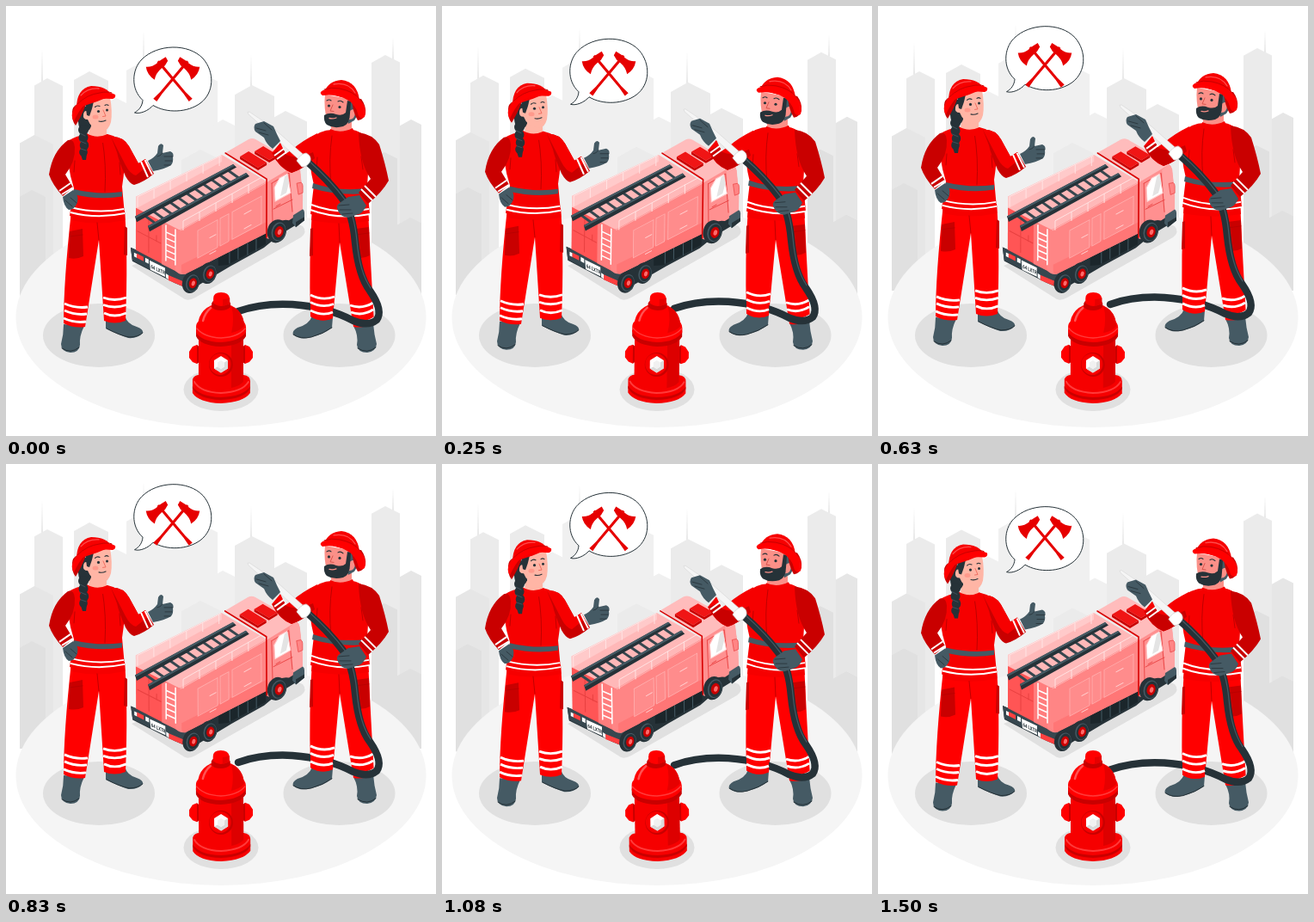
Recreate the animation shown at these times as an HTML page. Size 500 by 500 pixels, loop 1.54 s.

```html
<!DOCTYPE html>
<html lang="en">
<head>
<meta charset="utf-8">
<title>Firefighters</title>
<style>
html, body { margin: 0; width: 100%; height: 100%; overflow: hidden; background: #fff; }
svg { display: block; width: 100%; height: 100%; }
.bright { fill: #ff0000; }
.coat { fill: #f60000; }
.deep { fill: #c90000; }
.grey { fill: #455a64; }
.dark { fill: #263238; }
.skin { fill: #ffb5a5; }
.line { fill: none; stroke-linecap: round; stroke-linejoin: round; }
.stripe { fill: none; stroke: #fff; stroke-width: 2.9; }
.thin { stroke-width: 2; }
.fold { fill: none; stroke: #b80000; stroke-width: .9; stroke-linecap: round; }
.face { fill: none; stroke: #263238; stroke-width: 1.1; stroke-linecap: round; }
.rail { fill: none; stroke: #ffe6e6; stroke-width: .9; }
.panel { fill: #ff8c8c; stroke: #ffb0b0; stroke-width: .8; }
</style>
</head>
<body>
<svg viewBox="0 0 500 500">
  <g id="city"></g>

  <ellipse cx="250" cy="362" rx="238.500" ry="128" fill="#f5f5f5"/>
  <g fill="#e0e0e0">
    <ellipse cx="108" cy="383" rx="65" ry="37"/>
    <ellipse cx="387.500" cy="383" rx="65" ry="37"/>
    <ellipse cx="250" cy="446" rx="43.500" ry="25"/>
    <path d="M146 302L208 341Q213 343 220 339L343 269Q351 263 345 256L300 240Z"/>
  </g>

  <g id="truck">
    <path class="dark" d="M145 281L205 306L303 255L346 238V249L318 266L300 281L262 302L215 330L196 322L147 297Z"/>
    <path fill="#37474f" d="M145 281L198 307L212 311V329L196 321L147 296Z"/>
    <path fill="#1b262b" d="M247 291L302 264V277L258 301L247 302Z"/>
    <path class="line" stroke="#455a64" d="M260 286V299M270 281V294M281 276V289M291 271V284"/>
    <path fill="#ff4040" d="M152 288L160 292V297L152 293ZM189 313L208 321V327L189 319Z"/>
    <path fill="#fff" d="M149 287L152 288.500V293L149 291.500ZM162 293L166 295V300L162 298ZM186 311L189 313V318L186 316ZM167 296L185 304.500V315L168 307Z"/>
    <text transform="translate(168.500 305) skewY(25) scale(.72 1)" font-family="Roboto, sans-serif" font-weight="700" font-size="6" fill="#263238">64 LXTR</text>

    <path fill="#ffb8b8" d="M151 222L251 173L303 204L203 263L151 238Z"/>
    <path fill="#ffcaca" d="M151 222L251 173V181L151 236Z"/>
    <path fill="#ff5555" d="M151 235L203 262V311L151 284Z"/>
    <path fill="#ff7d7d" d="M181 250L203 261V311L181 300Z"/>
    <path fill="#ff8585" d="M196 264Q197 260 203 260L303 204V264L208 312Q202 313 197 308Z"/>
    <path class="line" stroke="#ffb0b0" d="M203 261L303 205"/>
    <path fill="#ff7676" d="M204 301L303 251V264L208 312Q204 312 204 308Z"/>
    <g transform="translate(203 262) skewY(-28.500)">
      <rect class="panel" x="20" y="10" width="23" height="32"/>
      <rect class="panel" x="46" y="10" width="10" height="32"/>
      <rect class="panel" x="60" y="10" width="34" height="32"/>
      <path class="line" stroke="#ffd2d2" d="M34 26h7M34 45h7M74 20h8M74 37h8"/>
    </g>
    <path class="line" stroke="#e84040" d="M166 248V287M153 262L180 276M175 267V274"/>
    <path class="line" stroke="#fff" stroke-width="1.500" d="M186 255V296M197 260V301M186 263L197 268M186 270L197 275M186 277L197 282M186 284L197 289M186 291L197 296"/>
    <path class="rail" d="M153 222L250 174M153 222V234M172 213V224M191 203V214M210 194V204M229 184V195M248 175V186M206 250L301 197M206 250V261M225 239V250M244 229V239M263 218V229M282 207V218"/>

    <g id="rungs" stroke="#37474f" stroke-width="3"></g>
    <path class="dark" d="M150 245L264 184L268 187.500L152 251.500ZM165 256L279 194L283 198L167 262.500Z"/>
    <path fill="#455a64" d="M150 245L264 184L266 185.500L151 247ZM165 256L279 194L281 195.500L166 258Z"/>

    <path fill="#ffbcbc" d="M256 170L282 155Q286 153 290 155L337 182Q340 185 337 187L306 205Z"/>
    <path fill="#ff9090" d="M303 205L338 184Q341 185 341.500 190L344 210L345 239L329 249Q316 247 309 259L306 271L303 270Z"/>
    <path fill="#ffa3a3" d="M330 190L338 184Q341 186 342 190L345 220V238L334 243Z"/>
    <path class="line" stroke="#d80000" stroke-width="1.600" d="M255 171L303 201V269"/>
    <path fill="#f01515" d="M289 169L299 163L316 173L306 179ZM272 175L282 169L303 182L293 188Z"/>
    <path fill="#c90000" d="M289 169L306 179L316 173V176L306 182L289 172ZM272 175L293 188L303 182V185L293 191L272 178Z"/>
    <path class="line" stroke="#e84040" stroke-width=".9" d="M309 206L329 194L333 239M309 206L310 251M311 236L333 225M314 233L319 230"/>
    <path fill="#fff" stroke="#ffd0d0" d="M312 211L318 200L327 195L331 217L313 227Z"/>
    <path fill="#e4e4e4" d="M319 221L324 198L327 196L329 205L326 217Z"/>
    <path fill="#ff8585" stroke="#e84040" stroke-width=".7" d="M338 206L343 205Q345 206 345 209V217L340 219Z"/>
    <path class="grey" d="M334 243L345 236Q347 237 347 240V249L337 257L333 252Z"/>
    <path class="dark" d="M337 251L347 245V249L337 257Z"/>
    <g id="wheels"></g>
  </g>

  <g id="woman">
    <!-- legs -->
    <path class="grey" d="M67 370L91 372Q85 384 86 394Q85 403 75 403Q64 402 64 393Q67 382 67 370Z"/>
    <path class="grey" d="M116 362L138 360Q141 370 152 373Q160 376 159 380Q153 387 142 386Q130 382 116 375Z"/>
    <path class="line" stroke="#263238" d="M65 398Q75 405 85 397M117 375Q132 383 143 385Q154 385 159 380"/>
    <path class="bright" d="M76 238H138Q142 290 139 366Q126 371 114 366L108 272L92 373Q79 375 67 369Q67 320 76 238Z"/>
    <path class="coat" d="M76 240H138L138.500 249Q106 256 75 249Z"/>
    <path class="deep" d="M74 262L89 259L90 291Q82 295 73 293ZM138 256L141 258V290L137 289Z"/>
    <path class="fold" d="M108 272L106 252M74 268L89 266"/>
    <path class="stripe" d="M68 346Q81 352 95 350M68 354Q81 360 94 358M67 363Q80 369 93 367M113 339Q126 344 140 339M113 347.500Q126 352.500 140 347.500M114 357Q126 363 140 357"/>
    <!-- coat -->
    <path class="coat" d="M72 157Q84 149 96 150L118 149Q132 152 140 163Q138 190 135 210L138 243Q106 252 74 244L79 212Q70 185 72 157Z"/>
    <path class="grey" d="M79 213Q108 220 135 216V221.500Q108 226 78 219Z"/>
    <path class="stripe thin" d="M75 234Q106 242 137 236M75 240Q106 248 138 241"/>
    <path class="fold" d="M112 155Q117 185 115 216M79 193L80 180M133 196L132 182"/>
    <path class="deep" d="M122 152Q136 151 143 163L154 183L162 178L172 195Q160 205 149 208Q144 207 139 198Q131 180 129 170Z"/>
    <path class="coat" d="M122 152Q136 151 143 163L154 183L162 178L166 185L151 197Q144 195 139 185Z"/>
    <path class="stripe thin" d="M157 181L165 199M161.500 179L170 196"/>
    <path class="grey" d="M165 180Q172 177 176 171L177 163Q180 158 183 162L182 171L191 169Q196 171 194 176Q195 181 192 185Q184 190 171 192Z"/>
    <path class="line" stroke="#263238" stroke-width=".8" d="M182 171Q179 175 176 175M184 175L194 175M185 180L193 180M184 185L191 185"/>
    <path class="deep" d="M72 156Q79 154 80 164Q81 181 69 196L78 211L66 221Q54 208 50 196Q54 169 72 156Z"/>
    <path class="stripe thin" d="M62 215L75 206M65 219L78 211"/>
    <path class="grey" d="M66 222L78 214Q85 220 83 228Q80 237 73 237Q67 233 66 222Z"/>
    <path class="line" stroke="#263238" stroke-width=".8" d="M69 226L77 233M75 223L82 229"/>
    <!-- head -->
    <path class="skin" d="M97 139L117 139L117 151Q107 156 96 151Z"/>
    <path class="coat" d="M94 148Q105 155 118 149L120 157Q106 162 92 157Z"/>
    <path class="dark" d="M84 117H99V140Q95 150 86 145Q82 130 84 117Z"/>
    <path class="skin" d="M94 112L121 106Q124 123 122 135Q119 146 111 145Q99 143 95 132Q89 132 90 126Q91 120 96 123Z"/>
    <path class="dark" d="M92 113L102 111Q100 121 97 128L94 127Z"/>
    <g class="dark">
      <ellipse cx="90" cy="144" rx="6" ry="6"/><ellipse cx="90" cy="153" rx="5.500" ry="6"/>
      <ellipse cx="91" cy="162" rx="5.200" ry="6"/><ellipse cx="90" cy="170" rx="4.800" ry="5"/>
      <path d="M87 173L94 172L93 179H89Z"/>
      <circle cx="107.500" cy="122.500" r="1.600"/><circle cx="117.500" cy="121" r="1.500"/>
    </g>
    <path class="line" stroke="#455a64" stroke-width=".8" d="M86 148L92 151M86 157L93 160M87 166L93 168"/>
    <path class="face" d="M103.500 117.500Q106 115 109 116.500M115 115.500Q117 114 119 115.500M108 134Q112 135 116 133"/>
    <path class="line" stroke="#f06f62" d="M113 121L116 128L112.500 128.500"/>
    <ellipse cx="104" cy="129" rx="3.500" ry="2.500" fill="#ff9a8c"/>
    <path class="deep" d="M77 123Q77 117 83 114L93 114Q88 128 81 139Q76 133 77 123Z"/>
    <path class="coat" d="M82 119Q82 96 99 93Q117 93 123 104L106 111Z"/>
    <path class="bright" d="M77 125Q82 106 107 102Q120 99 127 103Q128 107 124 108Q103 106 91 115Q85 121 79 134Q76 130 77 125Z"/>
    <path class="line" stroke="#c90000" d="M83 114Q94 103 109 101Q118 99 123 101"/>
    <path class="line" stroke="#ff4b4b" stroke-width="1.300" d="M87 104Q95 95 108 96"/>
  </g>

  <g id="man">
    <!-- legs -->
    <path class="grey" d="M356 360L380 362L379 374Q369 382 355 385Q342 389 334 382Q332 378 339 374Q353 370 356 360Z"/>
    <path class="grey" d="M404 372L427 369Q428 382 431 393Q430 402 420 403Q409 403 408 394Q410 383 404 372Z"/>
    <path class="line" stroke="#263238" d="M334 382Q343 388 355 385Q369 381 379 374M409 398Q420 405 430 397"/>
    <path class="bright" d="M356 236H421Q424 300 428 369Q416 375 404 373L388 275L380 363Q367 369 354 361Q352 295 356 236Z"/>
    <path class="coat" d="M356 240H421L422 250Q390 256 355 249Z"/>
    <path class="deep" d="M354 259L357 258V290L353 291ZM407 259L422 257L423 290Q416 294 408 293Z"/>
    <path class="fold" d="M388 275L387 253M407 266L422 264"/>
    <path class="stripe" d="M400 348Q414 353 427 345M401 356Q414 361 427 353M403 366Q415 371 428 363"/>
    <!-- coat -->
    <path class="coat" d="M352 156Q365 144 379 144H403Q417 146 423 163L420 210L423 242Q390 252 354 242L358 208Q352 185 352 156Z"/>
    <path class="grey" d="M357 206Q385 216 420 212V218Q386 221 356 212Z"/>
    <path class="stripe thin" d="M355 231Q386 243 422 236M354 237Q386 249 423 242"/>
    <path class="fold" d="M379 151Q375 178 378 208M361 191L362 176M415 190L413 175"/>
    <path class="coat" d="M362 148Q344 157 334 166L325 172L319 159L309 171Q318 189 332 194Q345 190 359 177Z"/>
    <path class="deep" d="M310 171L322 166L326 173Q338 179 357 170L359 177Q345 190 332 194Q317 188 310 171Z"/>
    <path class="stripe thin" d="M312 174L323 166M315 178L326 170"/>
    <!-- hose -->
    <path class="line" stroke="#263238" stroke-width="8.500" d="M349 180Q374 201 391 224Q403 240 406 275Q410 314 423 331Q439 354 431 365Q421 373 404 366Q374 350 333 347Q298 345 270 355"/>
    <path class="line" stroke="#455a64" stroke-width="1.200" d="M352 180Q378 203 394 225Q405 241 408 273Q411 309 424 328"/>
    <path class="bright" d="M354 310L381 310L380 363Q367 369 354 361Z"/>
    <path class="stripe" d="M354 336Q368 343 382 338M354 344.500Q368 351.500 381 346.500M354 354Q368 361 380 356"/>
    <path fill="#f5f5f5" stroke="#d5d5d5" stroke-width=".6" d="M281 123.500L283 123L311 142L345 172L341 179L308 149L282 126Z"/>
    <path fill="#fff" stroke="#d5d5d5" stroke-width=".8" d="M338 180Q342 172 349 171Q355 174 354 180Q350 188 344 187Z"/>
    <path class="grey" d="M290 137L300 134L311 140L315 149L319 157L310 166Q303 161 300 153L290 146Q287 141 290 137Z"/>
    <path class="line" stroke="#263238" stroke-width=".8" d="M291 142L302 145M294 147L305 150M300 136L309 144"/>
    <!-- near arm -->
    <path class="deep" d="M410 147Q426 149 434 161Q441 183 445 203Q437 217 421 230L410 217L424 201Q411 182 410 147Z"/>
    <path class="stripe thin" d="M413 213L426 226M417 209L430 222"/>
    <path class="grey" d="M411 220L419 232Q415 242 407 243L398 246Q389 245 386 238Q383 232 388 229L398 222Z"/>
    <path class="line" stroke="#263238" stroke-width=".8" d="M387 232L399 231M388 237L401 237M391 242L403 241"/>
    <!-- head -->
    <path fill="#fb9088" d="M378 135H402V146Q389 153 378 146Z"/>
    <path class="coat" d="M377 143Q389 149 403 142L406 149Q390 155 376 149Z"/>
    <path class="grey" d="M393 106L410 111Q411 125 405 133L398 137Z"/>
    <path fill="#fb9088" d="M371 103L399 108L398 124Q404 117 406 123Q406 132 399 132L392 139L374 137Q369 118 371 103Z"/>
    <path class="dark" d="M397 110L401 111L400 125Q400 137 392 140Q381 143 373 138Q369 134 370 127Q376 123 384 126Q391 128 395 124Z"/>
    <path class="line" stroke="#fb9088" stroke-width="1.300" d="M376 130.500Q380 131.500 384 130"/>
    <circle class="dark" cx="375.500" cy="116" r="1.600"/><circle class="dark" cx="388" cy="117.500" r="1.600"/>
    <path class="face" d="M373 110Q376 108 378 110M386 111Q389 109 392 112"/>
    <path class="line" stroke="#d9544c" d="M380 115L377 122L381 122.500"/>
    <path class="deep" d="M402 108L413 108Q419 116 418 125Q416 132 409 133Q403 123 402 108Z"/>
    <path class="coat" d="M370 100Q375 87 390 86Q408 88 411 109L390 106Z"/>
    <path class="bright" d="M366 100Q370 95 386 97Q407 100 416 115Q419 122 417 129Q413 132 410 128Q407 113 393 107Q381 102 368 104Q365 102 366 100Z"/>
    <path class="line" stroke="#c90000" d="M370 97Q378 94 388 96Q404 99 412 109"/>
    <path class="line" stroke="#ff4b4b" stroke-width="1.300" d="M381 91Q398 88 406 101"/>
  </g>

  <g id="hydrant">
    <path class="coat" d="M217 434Q219 429 225 429H276Q284 430 284 436V450Q276 461 250 462Q224 461 217 450Z"/>
    <path class="deep" d="M217 442Q224 454 250 455Q277 454 284 442V445Q277 457 250 458Q224 457 217 445Z"/>
    <path class="line" stroke="#ff3a3a" stroke-width="2" d="M219 437Q226 449 250 450Q275 449 282 437"/>
    <path class="bright" d="M213 402L217 396L222 394L227 399V412L222 416L217 414L213 409ZM287 402L283 396L278 394L273 399V412L278 416L283 414L287 409Z"/>
    <path class="deep" d="M222 394L227 399V412L222 416ZM278 394L273 399V412L278 416Z"/>
    <path class="coat" d="M224 380H276V437Q270 445 250 446Q230 445 224 437Z"/>
    <path fill="#dd0000" d="M262 385H276V437Q272 442 262 444Z"/>
    <path class="deep" d="M221 377Q250 398 279 377V384Q273 395 250 396Q226 395 221 384Z"/>
    <path class="bright" d="M221 373Q221 368 225 366H275Q280 369 279 379Q272 390 250 391Q226 390 221 379Z"/>
    <path class="line" stroke="#ff3a3a" stroke-width="1.500" d="M222 375Q230 385 250 386Q270 385 278 375"/>
    <path class="bright" d="M223 372Q224 349 250 345Q276 349 277 372Q269 381 250 382Q230 381 223 372Z"/>
    <path fill="#e60000" d="M262 349Q276 355 277 372Q272 378 262 380Q266 364 262 349Z"/>
    <path class="line" stroke="#ff5252" stroke-width="2.500" d="M229 366Q231 357 238 351"/>
    <path class="deep" d="M239 346Q240 341 250 341Q260 341 261 346V350Q257 354 250 354Q242 354 239 350Z"/>
    <path class="bright" d="M241 340Q241 333 250 333Q259 333 260 340V346Q255 349 250 349Q243 348 241 345Z"/>
    <path fill="#e60000" d="M252 341Q257 341 260 339V346Q256 348 252 349Z"/>
    <circle class="deep" cx="250" cy="417" r="14"/>
    <circle class="coat" cx="249" cy="416.500" r="12.500"/>
    <path fill="#fff" d="M250 407L258 412V421.500L250 426.500L242 421.500V412Z"/>
    <path fill="#dadada" d="M250 426.500L258 421.500V412L254 414.500V419.500L250 422L246 419.500L242 421.500Z"/>
    <path fill="#f1f1f1" d="M250 412L254 414.500V419.500L250 422L246 419.500V414.500Z"/>
  </g>

  <path id="bubble" fill="#fff" stroke="#263238" d="M159 109.500C145 97 146 74 158 62C176 44 212 43 229 61C243 77 242 101 226 113C211 124 187 125 171 115.500C166 121.500 156 126 149.500 124C155 121 158.500 116 159 109.500Z"/>
  <g id="axes">
    <g id="axe" fill="#e60000" transform="translate(180 68) rotate(-40)">
      <path d="M-1.600 -5H1.600L1.500 43L2.600 54H-2.600L-1.500 43Z"/>
      <path d="M-2 -4Q-10 -4 -15 -9Q-20 -1 -17 9Q-11 4 -2 4H3L9 2L10 -3L3 -4Z"/>
    </g>
    <use href="#axe" transform="translate(388 0) scale(-1 1)"/>
  </g>
</svg>
<script>
const $ = id => document.getElementById(id);
const tones = ['#f0f0f0', '#ebebeb', '#e6e6e6', '#e0e0e0'];

// left x, peak x, right x, peak y, tone
const blocks = [
  [140, 163, 190, 62, 0], [190, 219, 246, 74, 0], [241, 252, 268, 132, 0],
  [33, 48, 66, 84, 1], [79, 97, 119, 76, 1], [119, 128, 141, 107, 0],
  [266, 286, 312, 92, 1], [309, 325, 350, 122, 1], [425, 441, 458, 57, 1],
  [204, 226, 250, 167, 1], [16, 33, 55, 150, 2], [458, 471, 483, 132, 2],
  [425, 440, 455, 170, 3], [16, 30, 46, 214, 3], [455, 470, 483, 246, 3]
];
const city = blocks.map(([l, p, r, y, tone]) => {
  const a = y + (p - l) * .56, b = y + (r - p) * .5;
  return `<path fill="${tones[tone]}" d="M${l} 339V${a}L${p} ${y}L${r} ${b}V339Z"/>`;
});
const spires = [[42, 49, 88], [160, 28, 64], [285, 55, 94], [450, 36, 62], [441, 122, 172]];
$('city').innerHTML = spires.map(([x, top, end]) =>
  `<path fill="#e6e6e6" d="M${x} ${top}L${x + .9} ${end}H${x - .9}Z"/>`).join('') + city.join('');

$('rungs').innerHTML = Array.from({ length: 11 }, (_, i) => {
  const x = 160 + i * 9.8, y = 243 - i * 5.2;
  return `<path d="M${x} ${y}l14 10"/>`;
}).join('');

$('wheels').innerHTML = [[216, 322, 1], [236, 311, 1], [316, 262, 1.1]].map(([x, y, size]) =>
  `<g transform="translate(${x} ${y}) rotate(16) scale(${size})">
    <ellipse class="dark" cx="-1" rx="10" ry="12.500"/>
    <ellipse class="grey" cx="1" rx="7.500" ry="10"/>
    <ellipse class="dark" cx="1.500" rx="6.500" ry="9"/>
    <ellipse class="deep" cx="1.500" rx="4.500" ry="6"/>
    <ellipse cx="2" rx="2" ry="3" fill="#ff6a6a"/>
  </g>`).join('');

const LOOP = 1540, STEPS = 37;
const floats = { city: 10, woman: 10, man: 10, axes: 20, bubble: 30 };
const swings = { truck: '247 245', hydrant: '250 397' };

// straight up and down: 0 at the ends of a cycle, 1 in its middle
const wave = p => 1 - Math.abs(p % 1 * 2 - 1);
const phase = step => (step + 1) / STEPS;
const rest = wave(phase(0));

function draw(now) {
  const p = phase(Math.floor((now + 5) % LOOP / LOOP * STEPS));
  const lift = rest - wave(p);
  const angle = wave(p + .25) * 2 - 1;
  for (const id in floats)
    $(id).setAttribute('transform', `translate(0 ${lift * floats[id]})`);
  for (const id in swings)
    $(id).setAttribute('transform', `rotate(${angle} ${swings[id]})`);
}

const start = performance.now();
function frame() {
  draw(performance.now() - start);
  requestAnimationFrame(frame);
}
frame();
</script>
</body>
</html>
```
